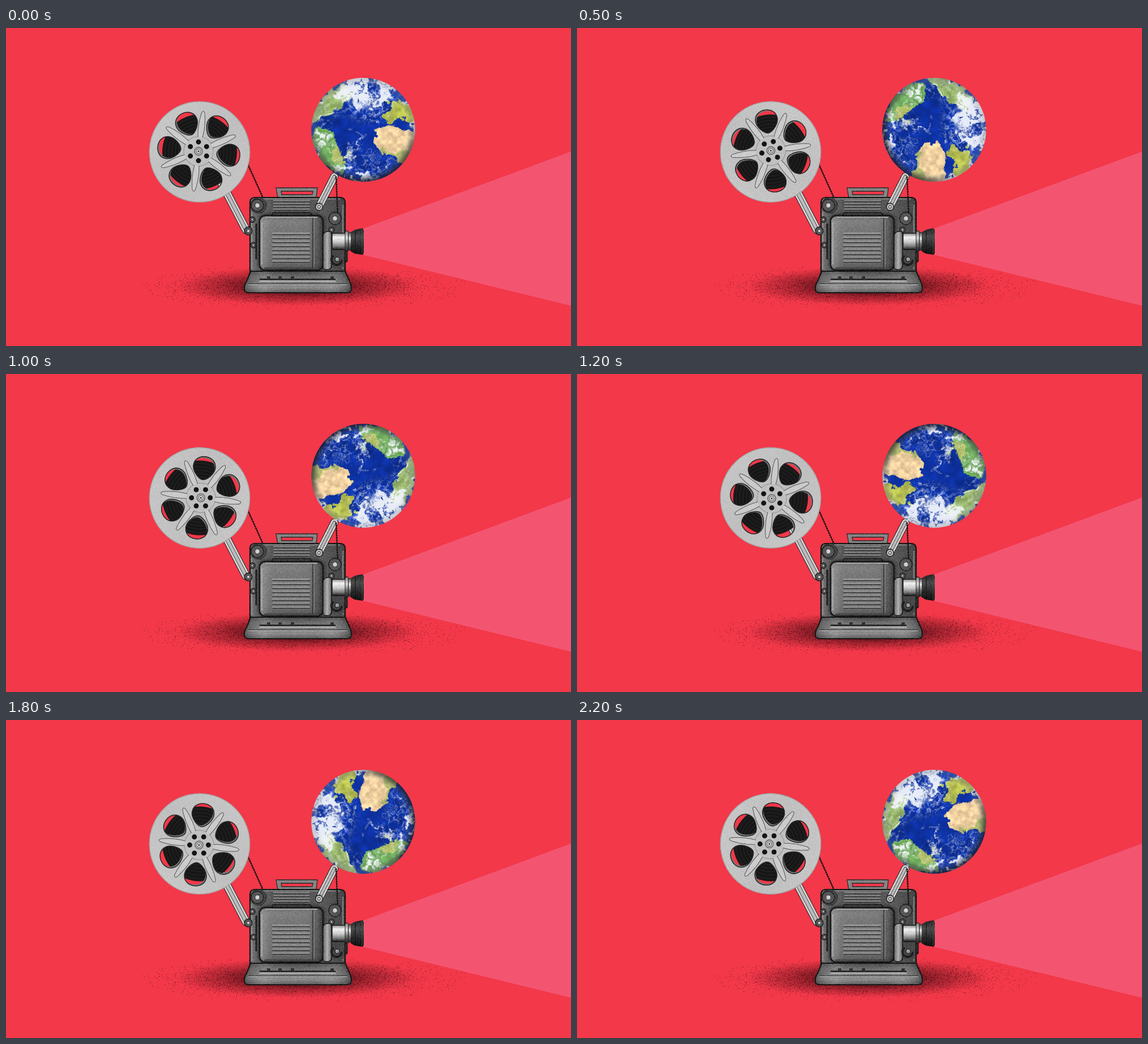
These frames come from a looping animation (998 by 561 pixels, 2300 ms). An HTML page with a canvas:

```html
<!DOCTYPE html>
<html lang="en">
<head>
<meta charset="utf-8">
<title>World projector</title>
<style>
html, body { margin: 0; width: 100%; height: 100%; overflow: hidden; background: #f23849; }
canvas { display: block; width: 100vw; height: 100vh; }
</style>
</head>
<body>
<canvas id="stage" width="998" height="561"></canvas>
<script>
const W = 998, H = 561, LOOP = 2300, STEP = 100, TURN = Math.PI / 12;
const TAU = Math.PI * 2;
const ctx = document.getElementById('stage').getContext('2d');

function layer(w, h, scale = 1) {
  const c = document.createElement('canvas');
  c.width = w * scale;
  c.height = h * scale;
  const g = c.getContext('2d', { willReadFrequently: true });
  g.scale(scale, scale);
  return g;
}

let seed = 7;
function rnd() {
  seed = (seed + 0x6d2b79f5) | 0;
  let t = Math.imul(seed ^ (seed >>> 15), 1 | seed);
  t = (t + Math.imul(t ^ (t >>> 7), 61 | t)) ^ t;
  return ((t ^ (t >>> 14)) >>> 0) / 4294967296;
}
const gauss = () => Math.sqrt(-2 * Math.log(1 - rnd())) * Math.cos(TAU * rnd());
const clamp = v => Math.max(0, Math.min(1, v));
const mix = (a, b, t) => a + (b - a) * t;
function smooth(a, b, v) {
  const t = clamp((v - a) / (b - a));
  return t * t * (3 - 2 * t);
}

function hash(x, y) {
  const s = Math.sin(x * 127.1 + y * 311.7) * 43758.5453;
  return s - Math.floor(s);
}
function noise(x, y) {
  const i = Math.floor(x), j = Math.floor(y);
  const u = smooth(0, 1, x - i), v = smooth(0, 1, y - j);
  return mix(mix(hash(i, j), hash(i + 1, j), u), mix(hash(i, j + 1), hash(i + 1, j + 1), u), v);
}
function fbm(x, y) {
  let sum = 0, amp = 0.5;
  for (let k = 0; k < 5; k++) {
    sum += amp * noise(x, y);
    x = x * 2.03 + 11.3;
    y = y * 2.03 + 5.7;
    amp /= 2;
  }
  return sum;
}

// Speckles whatever is already painted on a layer.
function grain(g, amount) {
  const img = g.getImageData(0, 0, g.canvas.width, g.canvas.height), d = img.data;
  for (let i = 0; i < d.length; i += 4) {
    if (!d[i + 3]) continue;
    const n = (rnd() - 0.5) * amount;
    d[i] += n; d[i + 1] += n; d[i + 2] += n;
  }
  g.putImageData(img, 0, 0);
}

function poly(g, pts, fill) {
  g.beginPath();
  for (let i = 0; i < pts.length; i += 2) g.lineTo(pts[i], pts[i + 1]);
  g.closePath();
  g.fillStyle = fill;
  g.fill();
}
function box(g, x, y, w, h, r, fill, line, lw = 1.5) {
  g.beginPath();
  g.roundRect(x, y, w, h, r);
  if (fill) { g.fillStyle = fill; g.fill(); }
  if (line) { g.strokeStyle = line; g.lineWidth = lw; g.stroke(); }
}
function disc(g, x, y, r, fill, line, lw = 1.5) {
  g.beginPath();
  g.arc(x, y, r, 0, TAU);
  if (fill) { g.fillStyle = fill; g.fill(); }
  if (line) { g.strokeStyle = line; g.lineWidth = lw; g.stroke(); }
}
function seg(g, x1, y1, x2, y2, color, w, cap = 'butt') {
  g.beginPath();
  g.moveTo(x1, y1);
  g.lineTo(x2, y2);
  g.strokeStyle = color;
  g.lineWidth = w;
  g.lineCap = cap;
  g.stroke();
}
function ramp(g, x1, y1, x2, y2, ...colors) {
  const r = g.createLinearGradient(x1, y1, x2, y2);
  colors.forEach((c, i) => r.addColorStop(i / (colors.length - 1), c));
  return r;
}
function arm(g, x1, y1, x2, y2, w) {
  seg(g, x1, y1, x2, y2, '#222', w + 2, 'round');
  seg(g, x1, y1, x2, y2, '#d2d2d2', w, 'round');
  seg(g, x1, y1, x2, y2, '#444', w - 6, 'round');
  seg(g, x1, y1, x2, y2, '#bcbcbc', w - 8, 'round');
}
function chain(g, x1, y1, x2, y2) {
  seg(g, x1, y1, x2, y2, '#3a1a1e', 1.4);
  g.setLineDash([2.5, 1.8]);
  seg(g, x1, y1, x2, y2, '#141414', 2.6);
  g.setLineDash([]);
}
function roller(g, x, y, r) {
  disc(g, x, y, r, '#555', '#1c1c1c', 1.4);
  disc(g, x, y, r * 0.38, '#d0d0d0', '#333', 0.8);
}

function makeBackdrop() {
  const g = layer(W, H);
  g.fillStyle = '#f23849';
  g.fillRect(0, 0, W, H);
  poly(g, [630, 354, 998, 218, 998, 490, 630, 400], '#f35571');

  g.save();
  g.translate(515, 455);
  g.scale(1, 0.16);
  const glow = g.createRadialGradient(0, 0, 60, 0, 0, 215);
  glow.addColorStop(0, 'rgba(30,4,8,.75)');
  glow.addColorStop(0.35, 'rgba(40,4,8,.4)');
  glow.addColorStop(1, 'rgba(50,4,8,0)');
  disc(g, 0, 0, 215, glow);
  g.restore();
  for (let i = 0; i < 6500; i++) {
    const x = 515 + gauss() * 105, y = 456 + gauss() * 14;
    if (((x - 525) / 292) ** 2 + ((y - 456) / 42) ** 2 > 1) continue;
    g.fillStyle = rnd() < 0.5 ? 'rgba(53,9,15,.6)' : 'rgba(110,20,30,.5)';
    g.fillRect(Math.round(x), Math.round(y), 1, 1);
  }
  return g.canvas;
}

function makeProjector() {
  const g = layer(W, H);
  const ink = '#161616';

  // handle
  g.beginPath();
  g.moveTo(477, 282); g.lineTo(550, 282); g.lineTo(548, 299); g.lineTo(480, 299); g.closePath();
  g.moveTo(486, 288); g.lineTo(487, 294); g.lineTo(541, 294); g.lineTo(542, 288); g.closePath();
  g.fillStyle = '#858585';
  g.fill('evenodd');
  g.strokeStyle = '#2a2a2a';
  g.lineWidth = 1.3;
  g.stroke();

  // back plate
  box(g, 431, 299, 168, 135, [8, 8, 3, 3], ramp(g, 431, 0, 600, 0, '#707070', '#565656', '#505050', '#5c5c5c', '#444'), ink, 2.2);
  seg(g, 440, 301.5, 590, 301.5, '#8c8c8c', 1.4);
  seg(g, 595, 312, 595, 425, '#7a7a7a', 2.5);
  seg(g, 434, 325, 434, 425, '#888', 3);
  for (let i = 0; i < 4; i++) {
    seg(g, 473, 304.5 + i * 5, 536, 304.5 + i * 5, '#8b8b8b', 2, 'round');
    seg(g, 473, 306.5 + i * 5, 536, 306.5 + i * 5, '#303030', 1.2, 'round');
  }

  arm(g, 580, 262, 553, 315, 12);
  disc(g, 553, 315.5, 6.5, '#b5b5b5', ink, 1.3);
  disc(g, 553, 315.5, 2.5, '#ddd', '#333', 1);
  chain(g, 583, 262, 586, 330);
  disc(g, 446, 313, 14, '#494949', '#222', 1);
  roller(g, 444, 313, 11);
  roller(g, 581, 336, 11);
  roller(g, 575, 356, 5);
  roller(g, 435, 338, 5);
  roller(g, 428, 358, 7);
  roller(g, 437, 383, 5);
  seg(g, 442, 345, 442, 408, '#222', 3);

  // door, with its cast shadow
  box(g, 470, 326, 69, 8, 3, '#5b5b5b', ink, 1.5);
  g.save();
  g.shadowColor = 'rgba(0,0,0,.7)';
  g.shadowBlur = 7;
  box(g, 448, 331, 112, 96, 10, ramp(g, 0, 331, 0, 427, '#848484', '#757575', '#707070', '#616161'), ink, 2.4);
  g.restore();
  box(g, 449, 332, 110, 94, 9, ramp(g, 449, 0, 560, 0, 'rgba(190,190,190,.5)', 'rgba(120,120,120,0)', 'rgba(100,100,100,0)', 'rgba(90,90,90,.1)', 'rgba(20,20,20,.5)'));
  seg(g, 458, 334, 550, 334, '#a2a2a2', 2);
  seg(g, 452, 342, 452, 417, '#aaa', 2);
  seg(g, 456, 424, 552, 424, '#454545', 3);
  seg(g, 542, 335, 542, 423, '#333', 1.6);
  seg(g, 544, 336, 544, 422, '#929292', 1);
  for (let y = 362; y <= 411; y += 7) {
    seg(g, 471, y, 536, y, '#9f9f9f', 2.2, 'round');
    seg(g, 471, y + 2.4, 536, y + 2.4, '#3c3c3c', 1.3, 'round');
  }

  // side housing and gears
  box(g, 560, 359, 15, 67, [8, 4, 6, 4], ramp(g, 560, 0, 575, 0, '#666', '#b0b0b0', '#686868'), ink, 1.5);
  box(g, 576, 388, 22, 34, 4, '#484848');
  g.beginPath();
  g.arc(584, 409, 9, 0.2, Math.PI * 1.25);
  g.strokeStyle = '#202020';
  g.lineWidth = 4;
  g.stroke();
  disc(g, 585, 408, 4, '#999', ink, 1.2);
  box(g, 598, 394, 5, 19, 2, '#292929', '#111', 1);

  // lens
  box(g, 576, 362, 26, 29, 2, ramp(g, 0, 362, 0, 391, '#888', '#f2f2f2', '#ccc', '#8a8a8a', '#222'), ink, 1.3);
  box(g, 599, 358, 6, 36, 2, ramp(g, 0, 358, 0, 394, '#777', '#ddd', '#666', '#222'), '#222', 1);
  box(g, 605, 361, 7, 31, 1, ramp(g, 0, 361, 0, 392, '#555', '#f0f0f0', '#777', '#222'), '#222', 1);
  poly(g, [609, 360, 616, 356, 630, 353, 632, 357, 632, 397, 630, 400, 616, 398, 609, 394], ramp(g, 0, 353, 0, 400, '#222', '#4a4a4a', '#272727', '#101010'));
  seg(g, 617, 358, 617, 396, '#111', 1);
  seg(g, 629, 355, 629, 398, '#4d4d4d', 1);

  // base
  g.beginPath();
  g.moveTo(432, 429); g.lineTo(599, 429); g.lineTo(607, 447);
  g.quadraticCurveTo(610, 452, 610, 460); g.quadraticCurveTo(610, 467, 603, 467);
  g.lineTo(428, 467); g.quadraticCurveTo(421, 467, 421, 460);
  g.quadraticCurveTo(421, 452, 425, 447); g.closePath();
  g.fillStyle = ramp(g, 0, 429, 0, 467, '#484848', '#6c6c6c', '#787878', '#8c8c8c', '#5a5a5a');
  g.fill();
  g.fillStyle = ramp(g, 421, 0, 610, 0, 'rgba(30,30,30,.4)', 'rgba(200,200,200,.2)', 'rgba(90,90,90,0)', 'rgba(90,90,90,0)', 'rgba(190,190,190,.15)', 'rgba(20,20,20,.5)');
  g.fill();
  g.strokeStyle = ink;
  g.lineWidth = 2.2;
  g.stroke();
  seg(g, 428, 451, 603, 451, '#353535', 1.2);
  seg(g, 428, 453, 603, 453, '#a8a8a8', 1.6);
  seg(g, 448, 443.5, 582, 443.5, '#2c2c2c', 3);
  seg(g, 448, 446.5, 582, 446.5, '#c2c2c2', 1.8);
  for (const x of [461, 481, 503, 573]) box(g, x, 438, 6, 6, 1, '#303030');
  grain(g, 30);
  return g.canvas;
}

function makeReel() {
  const g = layer(190, 190, 2);
  g.translate(95, 95);
  const plate = new Path2D(), holes = new Path2D();
  const hole = new Path2D('M32 0C32 8 46 20 56 19.5C68 19 73 9 73 0C73 -9 68 -19 56 -19.5C46 -20 32 -8 32 0Z');
  plate.arc(0, 0, 89.3, 0, TAU);
  for (let i = 0; i < 6; i++) {
    const m = new DOMMatrix().translate(-1.5, -0.7).rotate(7 + i * 60);
    plate.addPath(hole, m);
    holes.addPath(hole, m);
  }
  g.save();
  g.beginPath();
  g.arc(0, 0, 88, 0, TAU);
  g.clip();
  g.translate(2.5, -1.5);
  g.fillStyle = '#777';
  g.fill(plate, 'evenodd');
  g.restore();
  g.fillStyle = ramp(g, -70, -70, 70, 70, '#c8c8c8', '#bfbfbf', '#c6c6c6');
  g.fill(plate, 'evenodd');
  disc(g, 0, 0, 88.6, null, '#9a9a9a', 1);
  g.strokeStyle = '#262626';
  g.lineWidth = 1.5;
  g.stroke(holes);

  g.translate(-2, -1);
  disc(g, 0, 0, 26, null, '#929292', 1);
  for (let i = 0; i < 6; i++) {
    g.save();
    g.rotate((37 + i * 60) * TAU / 360);
    g.beginPath();
    g.moveTo(25, -4);
    g.bezierCurveTo(38, -6, 54, -5.5, 68, -2.8);
    g.quadraticCurveTo(74, 0, 68, 2.8);
    g.bezierCurveTo(54, 5.5, 38, 6, 25, 4);
    g.fillStyle = '#cbcbcb';
    g.fill();
    g.strokeStyle = '#555';
    g.lineWidth = 1;
    g.stroke();
    g.restore();
    const a = (i + 0.5) * TAU / 6;
    disc(g, 16.5 * Math.cos(a), 16.5 * Math.sin(a), 4.5, '#141414');
  }
  disc(g, 0, 0, 7, '#bbb', '#555', 1.2);
  disc(g, 0, 0, 4, '#ddd', '#555', 1);
  disc(g, 0, 0, 1.5, '#333');
  grain(g, 26);
  return g.canvas;
}

function makeFilm() {
  const g = layer(140, 140, 2);
  g.translate(70, 70);
  disc(g, 0, 0, 66, '#191919');
  for (let r = 28; r < 64; r += 3) disc(g, 0, 0, r, null, r % 2 ? '#262626' : '#101010', 0.8);
  return g.canvas;
}

function makeGlobe() {
  const R = 92, S = 2, N = R * 2 * S;
  const map = layer(R * 2, R * 2);
  map.translate(R, R);
  map.fillStyle = '#0d309e';
  map.fillRect(-R, -R, R * 2, R * 2);
  poly(map, [-76,-48, -60,-66, -40,-80, -22,-76, -14,-60, -28,-54, -36,-44, -48,-40, -56,-26, -72,-16, -92,-14, -92,-30], '#94b266');
  poly(map, [-82,0, -68,-3, -56,6, -50,20, -44,32, -28,44, -25,55, -32,66, -42,78, -60,72, -78,50, -87,25], '#6aa556');
  poly(map, [-48,30, -28,44, -26,56, -42,62, -54,48], '#adba62');
  poly(map, [40,-30, 50,-34, 56,-50, 66,-56, 80,-45, 92,-30, 92,-8, 78,-14, 68,-20, 60,-24, 50,-14, 40,-18], '#b4bd4f');
  poly(map, [30,-6, 45,-12, 60,-7, 75,-5, 92,0, 92,60, 62,58, 58,46, 44,45, 32,40, 22,32, 19,22, 24,8], '#efd0a0');
  poly(map, [24,37, 48,40, 84,34, 92,60, 62,62, 58,46, 44,45, 32,42], '#b9c072');
  disc(map, 45, -50, 5, '#9fae50');
  const src = map.getImageData(0, 0, R * 2, R * 2).data;

  // cloud cover: x, y, radius, weight
  const cover = [[-25,-70,30,.16], [25,-72,34,.2], [15,-38,26,.15], [-6,-50,22,.12],
    [-66,12,16,.16], [-12,46,24,.12], [15,75,30,.09], [-62,-52,22,.1], [-88,-5,24,.1],
    [-42,2,22,-.1], [5,8,24,-.07], [56,14,26,-.14], [68,-30,14,-.06]];

  const g = layer(R * 2, R * 2, S);
  const img = g.createImageData(N, N), out = img.data;
  for (let j = 0; j < N; j++) for (let i = 0; i < N; i++) {
    const x = (i + 0.5) / S - R, y = (j + 0.5) / S - R, d = Math.hypot(x, y);
    if (d > R) continue;
    const wx = fbm(x / 12 + 40, y / 12 + 9) - 0.48, wy = fbm(x / 12 + 7, y / 12 + 70) - 0.48;
    const mx = Math.round(Math.max(0, Math.min(183, x + wx * 26 + R)));
    const my = Math.round(Math.max(0, Math.min(183, y + wy * 26 + R)));
    const k = (my * R * 2 + mx) * 4;
    const land = src[k + 1] > 80;
    const tone = land ? 0.78 + 0.48 * fbm(x / 7 + 3, y / 7 + 90) : 0.7 + 0.6 * fbm(x / 16 + 60, y / 16);
    let density = -0.035;
    for (const [cx, cy, cr, w] of cover) density += w * Math.exp(-((x - cx) ** 2 + (y - cy) ** 2) / (cr * cr));
    // clouds drift in long streaks across a slanted axis
    const u = x * 0.85 - y * 0.53, v = x * 0.53 + y * 0.85;
    const c = fbm(u / 26 + wx * 3.4 + 20, v / 14 + wy * 3.4 + 31);
    const ridge = 1 - Math.abs(2 * fbm(u / 15 + wx * 3 + 80, v / 7 + wy * 3 + 12) - 0.96);
    const wisp = 0.45 * smooth(0.84, 1, ridge) * smooth(-0.08, 0.08, density);
    const cloud = Math.max(wisp, 0.95 * smooth(0.47, 0.68, c + density));
    const rim = 1 - 0.6 * smooth(76, 92, d) * (0.25 + 0.75 * smooth(-20, 85, x * 0.25 + y));
    const haze = 0.22 * smooth(74, 90, d);
    const p = (j * N + i) * 4;
    [242, 246, 252].forEach((white, ch) => {
      const base = mix(src[k + ch] * tone, [190, 205, 225][ch], haze);
      out[p + ch] = mix(base, white, cloud) * rim;
    });
    out[p + 3] = 255 * clamp((R - d) * 1.5);
  }
  g.putImageData(img, 0, 0);
  return g.canvas;
}

const backdrop = makeBackdrop(), projector = makeProjector();
const reel = makeReel(), film = makeFilm(), globe = makeGlobe();

function spin(pic, x, y, size, angle) {
  ctx.save();
  ctx.translate(x, y);
  ctx.rotate(angle);
  ctx.drawImage(pic, -size / 2, -size / 2, size, size);
  ctx.restore();
}

function draw() {
  const t = performance.now() % LOOP;
  const angle = Math.floor(t / STEP) * TURN;
  ctx.drawImage(backdrop, 0, 0);
  arm(ctx, 375, 262, 424, 356, 13);
  chain(ctx, 427, 240, 455, 302);
  ctx.drawImage(projector, 0, 0);
  spin(film, 342, 218.5, 140, 0);
  spin(reel, 342, 218.5, 190, angle);
  spin(globe, 631, 179.5, 184, angle);
  requestAnimationFrame(draw);
}
draw();
</script>
</body>
</html>
```
